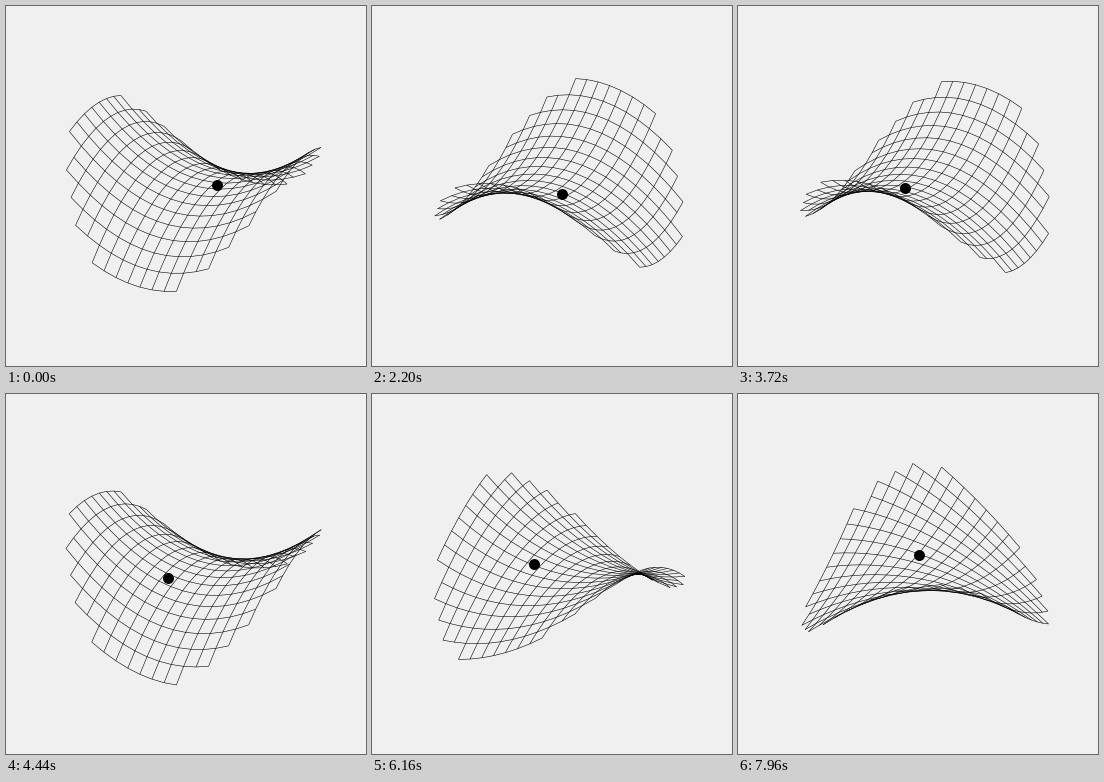
Recreate the animation shown at these times as a matplotlib script. Size 360 by 360 pixels, loop 8 s.

```python
import numpy as np
import matplotlib.pyplot as plt
from matplotlib.animation import FuncAnimation
from matplotlib.collections import LineCollection

SIZE, DPI = 360, 100
FRAMES, INTERVAL = 200, 40

# Camera: azimuth -60 deg, elevation 30 deg, mild perspective
CX, CY = 187.9, 175.7
SCALE, DIST = 13.57, 107.0
COS30, SIN30 = np.sqrt(3) / 2, 0.5

HEIGHT = 4.2                       # the peak of the saddle always has this height
PHASE, SPIN = 0.7, -0.24093        # degrees, degrees per ms

# Ball: slow circular drift plus a small wobble driven by the saddle
ORBIT, ORBIT_START, ORBIT_RATE = 2.14, 2.0, -0.0289
WOBBLE = 0.12

AXIS = np.arange(-8.5, 9)
GRID = AXIS[:, None] + 1j * AXIS[None, :]
INSIDE = np.abs(GRID) ** 2 < 88


def project(w, z):
    """Screen position of the point above w = x + iy at height z."""
    right = COS30 * w.real + SIN30 * w.imag
    near = SIN30 * w.real - COS30 * w.imag
    scale = SCALE * DIST / (DIST - COS30 * near - SIN30 * z)
    return CX + scale * right, CY + scale * (SIN30 * near - COS30 * z)


def saddle(w, psi):
    return (w ** 2 * np.exp(-1j * psi)).real


def ball_at(t, psi):
    drift = ORBIT * np.exp(1j * np.radians(ORBIT_START + ORBIT_RATE * t))
    wobble = WOBBLE * np.conj(drift) * np.exp(1j * psi)
    return (drift - wobble) / (1 - WOBBLE ** 2)


fig = plt.figure(figsize=(SIZE / DPI, SIZE / DPI), dpi=DPI, facecolor="#f0f0f0")
ax = fig.add_axes([0, 0, 1, 1])
ax.set_xlim(0, SIZE)
ax.set_ylim(SIZE, 0)
ax.axis("off")

mesh = LineCollection([], colors="black", linewidths=0.4)
ax.add_collection(mesh)
ball, = ax.plot([], [], "o", color="black", markersize=7.9, markeredgewidth=0,
                zorder=5)


def draw(i):
    t = i * INTERVAL
    psi = np.radians(PHASE + SPIN * t)
    raw = saddle(GRID, psi)
    gain = HEIGHT / raw[INSIDE].max()
    points = np.stack(project(GRID, gain * raw), axis=-1)
    rows = [points[k][INSIDE[k]] for k in range(len(AXIS))]
    cols = [points[:, k][INSIDE[:, k]] for k in range(len(AXIS))]
    mesh.set_segments(rows + cols)

    w = ball_at(t, psi)
    x, y = project(w, gain * saddle(w, psi))
    ball.set_data([x], [y])
    return mesh, ball


anim = FuncAnimation(fig, draw, frames=FRAMES, interval=INTERVAL,
                     init_func=lambda: draw(0), repeat=True, repeat_delay=0)
plt.show()
```
